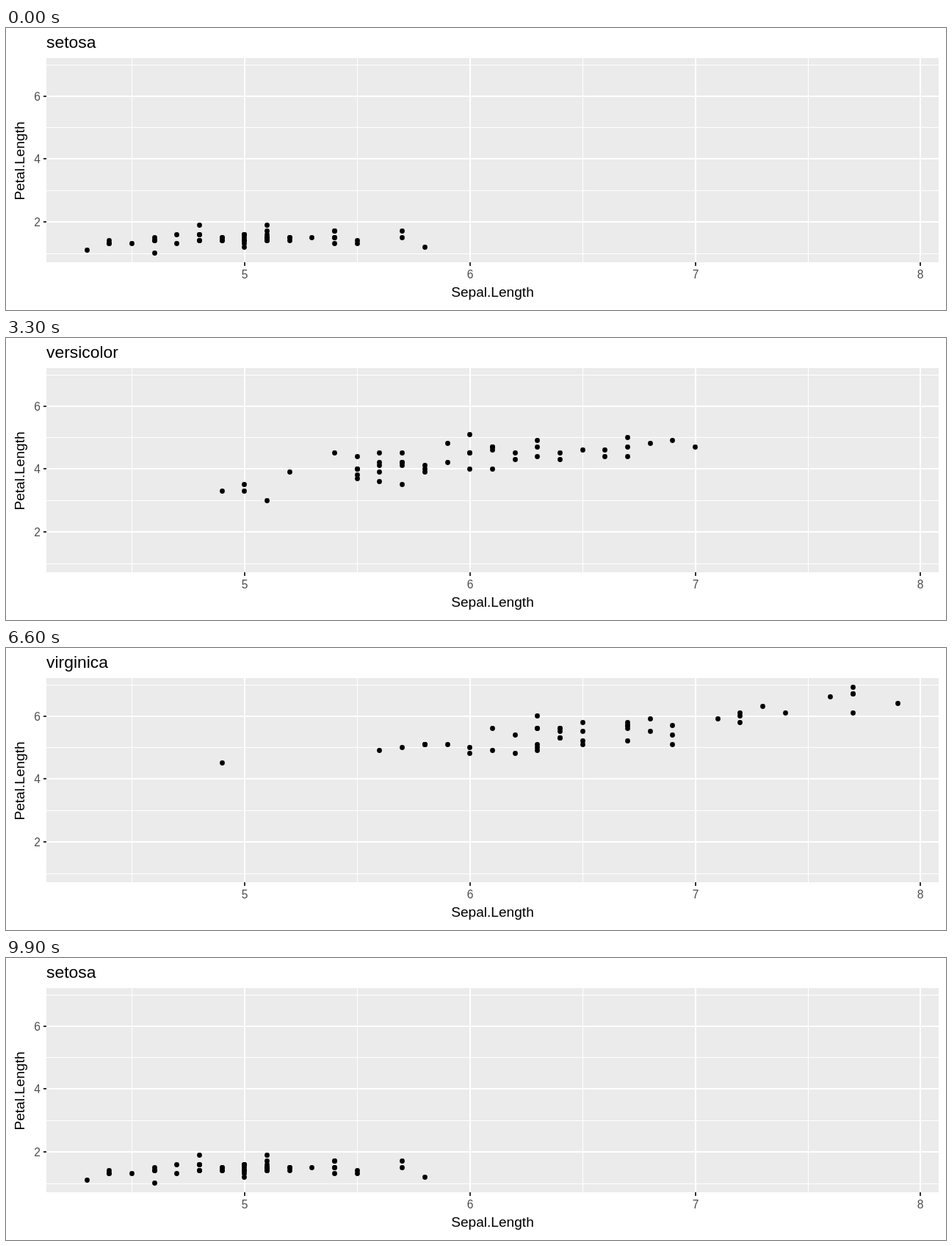
An HTML page for the animation above (10 s loop, 1280 px wide and 384 px high).

```html
<!DOCTYPE html>
<html lang="en">
<head>
<meta charset="utf-8">
<title>Iris scatter</title>
<style>
html, body { margin: 0; width: 100%; height: 100%; overflow: hidden; background: #fff; }
svg { display: block; width: 1280px; height: 384px; font-family: "Liberation Sans", Arial, sans-serif; }
</style>
</head>
<body>
<svg id="plot" viewBox="0 0 1280 384"></svg>
<script>
// Lengths in millimetres, one entry per flower.
const species = [
  {
    name: 'setosa',
    sepal: [51,49,47,46,50,54,46,50,44,49,54,48,48,43,58,57,54,51,57,51,54,51,46,51,48,
            50,50,52,52,47,48,54,52,55,49,50,55,49,44,51,50,45,44,50,51,48,51,46,53,50],
    petal: [14,14,13,15,14,17,14,15,14,15,15,16,14,11,12,15,13,14,17,15,17,15,10,17,19,
            16,16,15,14,16,16,15,15,14,15,12,13,14,13,15,13,13,13,16,19,14,16,14,15,14]
  },
  {
    name: 'versicolor',
    sepal: [70,64,69,55,65,57,63,49,66,52,50,59,60,61,56,67,56,58,62,56,59,61,63,61,64,
            66,68,67,60,57,55,55,58,60,54,60,67,63,56,55,55,61,58,50,56,57,57,62,51,57],
    petal: [47,45,49,40,46,45,47,33,46,39,35,42,40,47,36,44,45,41,45,39,48,40,49,47,43,
            44,48,50,45,35,38,37,39,51,45,45,47,44,41,40,44,46,40,33,42,42,42,43,30,41]
  },
  {
    name: 'virginica',
    sepal: [63,58,71,63,65,76,49,73,67,72,65,64,68,57,58,64,65,77,77,60,69,56,77,63,67,
            72,62,61,64,72,74,79,64,63,61,77,63,64,60,69,67,69,58,68,67,67,63,65,62,59],
    petal: [60,51,59,56,58,66,45,63,58,61,51,53,55,50,51,53,55,67,69,50,57,49,67,49,57,
            60,48,49,56,58,61,64,56,51,56,61,56,55,48,54,56,51,51,59,57,52,50,52,54,51]
  }
];

const LOOP = 10000, STEP = 100, REST = 19, CYCLE = 33, MOVE = 14;
const svg = document.getElementById('plot');
const px = v => 55.35 + (v - 4.12) * 306.84;
const py = v => 319.85 - (v - 0.705) * 42.84;

function add(tag, attrs, text) {
  const el = document.createElementNS('http://www.w3.org/2000/svg', tag);
  for (const key in attrs) el.setAttribute(key, attrs[key]);
  if (text) el.textContent = text;
  return svg.appendChild(el);
}

const rect = (x, y, width, height, fill) => add('rect', { x, y, width, height, fill });
const label = (text, x, y, size, anchor, fill = '#000', more = {}) =>
  add('text', { x, y, 'font-size': size, 'text-anchor': anchor, fill, ...more }, text);

rect(55, 41, 1215, 278, '#ebebeb');

for (const v of [4.5, 5.5, 6.5, 7.5]) rect(Math.floor(px(v)), 41, 1, 278, '#fff');
for (const v of [1, 3, 5, 7]) rect(55, Math.floor(py(v)), 1215, 1, '#fff');

for (const v of [2, 4, 6]) {
  const y = Math.floor(py(v));
  rect(55, y - 1, 1215, 2, '#fff');
  rect(51, y - 1, 4, 2, '#333');
  label(v, 47, y + 6, 15.6, 'end', '#4d4d4d');
}
for (const v of [5, 6, 7, 8]) {
  const x = Math.floor(px(v));
  rect(x - 1, 41, 2, 278, '#fff');
  rect(x - 1, 319, 2, 5, '#333');
  label(v, x, 340.5, 15.6, 'middle', '#4d4d4d');
}

label('Sepal.Length', 662.5, 366, 19.1, 'middle');
label('Petal.Length', 0, 0, 19.1, 'middle', '#000', { transform: 'translate(25 181) rotate(-90)' });
const title = label('setosa', 55, 27, 22.9, 'start');
const dots = species[0].sepal.map(() => add('circle', { r: 3.4 }));

const mix = (a, b, p) => (a + (b - a) * p) / 10;

// Points sit on whole pixels and move in equal steps.
function draw(ms) {
  const n = Math.floor((ms % LOOP) / STEP) - REST - 1;
  const leg = Math.max(0, Math.floor(n / CYCLE));
  const p = n < 0 ? 0 : Math.min(n % CYCLE + 1, MOVE) / MOVE;
  const from = species[leg], to = species[(leg + 1) % 3];
  title.textContent = (p > 0.5 ? to : from).name;
  dots.forEach((dot, i) => {
    const x = px(mix(from.sepal[i], to.sepal[i], p));
    const y = py(mix(from.petal[i], to.petal[i], p));
    dot.setAttribute('cx', Math.round(x) - 0.5);
    dot.setAttribute('cy', Math.round(y) - 0.5);
  });
}

let start;
function tick(now) {
  start ??= now;
  draw(now - start);
  requestAnimationFrame(tick);
}
draw(0);
requestAnimationFrame(tick);
</script>
</body>
</html>
```
